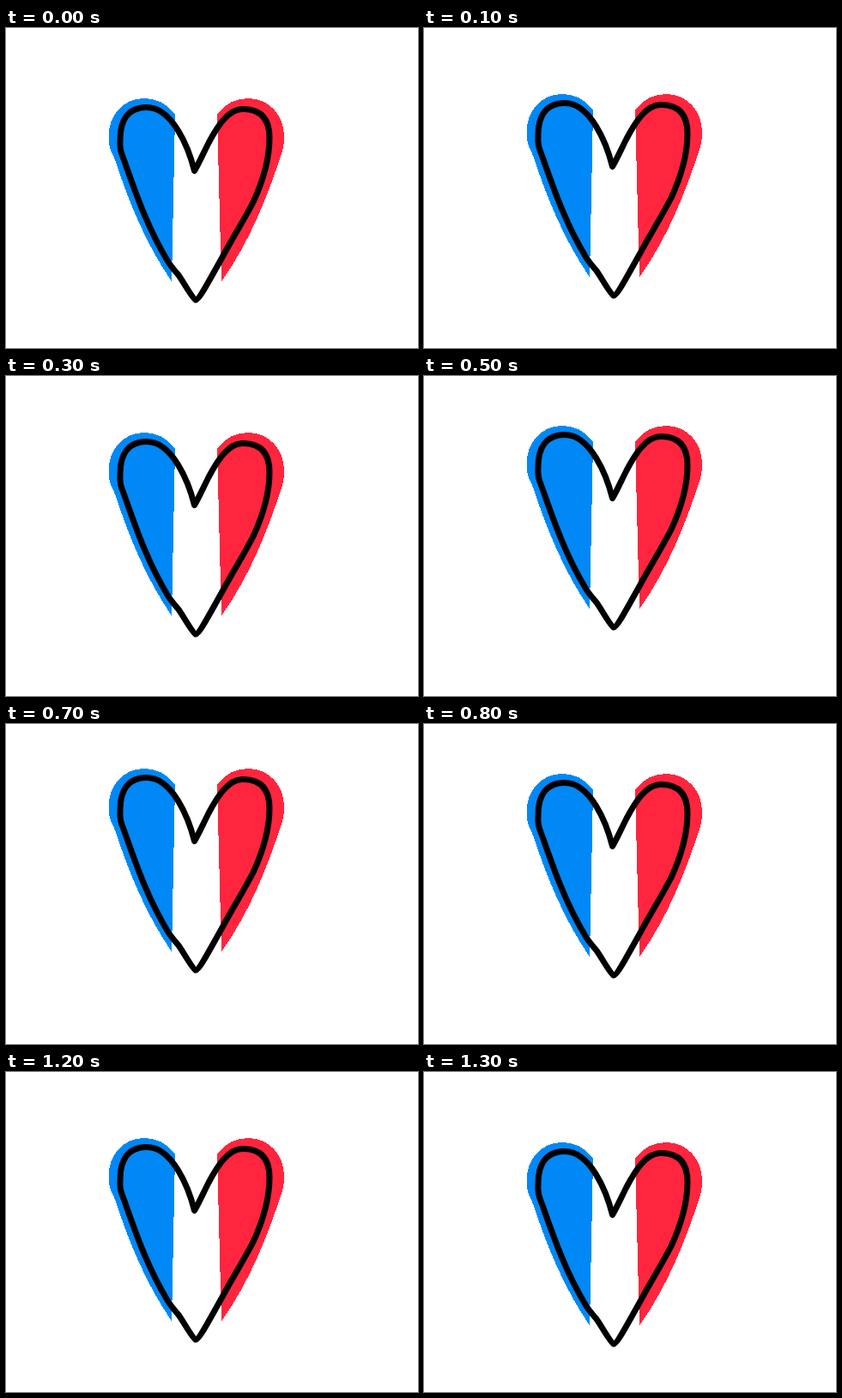
An HTML page that plays this animation: 480 by 373 pixels, repeating every 1400 ms.

```html
<!DOCTYPE html>
<html lang="en">
<head>
<meta charset="utf-8">
<title>Bouncing heart</title>
<style>
  html, body { margin: 0; width: 100%; height: 100%; overflow: hidden; background: #fff; }
  svg { display: block; width: 100%; height: 100%; }
</style>
</head>
<body>
<svg viewBox="0 0 480 373">
  <g id="heart">
    <g shape-rendering="crispEdges">
      <path fill="#0088f7" d="M197 101C188 88 175 82 161 82C136 82 119.500 102 119.500 127C119.500 137 122 144 126 151C142 200 163 252 193 295.500Z"/>
      <path fill="#ff253e" d="M246 101C255 88 268 82 282 82C307 82 324 102 324 127C324 135 323 141 321 147C305 194 286 246 251 295.500Z"/>
    </g>
    <path fill="none" stroke="#000" stroke-width="7" stroke-linejoin="round" d="M219.500 166.500
      C213 140 194 92.500 164 92.500 C141 92.500 133 109 133 130
      C132 145 136 148 140 161 C154 201 167 236 188 271
      C192 278 197 283 201 288 C208 298 217 315 221 317
      C225 317 238 292 251 269 C264 245 276 226 288 203
      C300 177 307 152 307 128 C307 106 297 95 277 94.500
      C259 93 245 117 236 134 C229 148 222 163 219.500 166.500Z"/>
  </g>
</svg>
<script>
  const heart = document.getElementById("heart");
  const rise = [0, 5, 10.500, 16, 20, 24, 30];
  const STEP = 100, COUNT = rise.length * 2;

  // Climb through the heights in held steps, then mirror back down.
  function draw(now) {
    const i = Math.floor(now / STEP) % COUNT;
    const y = rise[Math.min(i, COUNT - 1 - i)];
    heart.setAttribute("transform", `translate(0 ${-y})`);
    requestAnimationFrame(draw);
  }
  draw(0);
</script>
</body>
</html>
```
